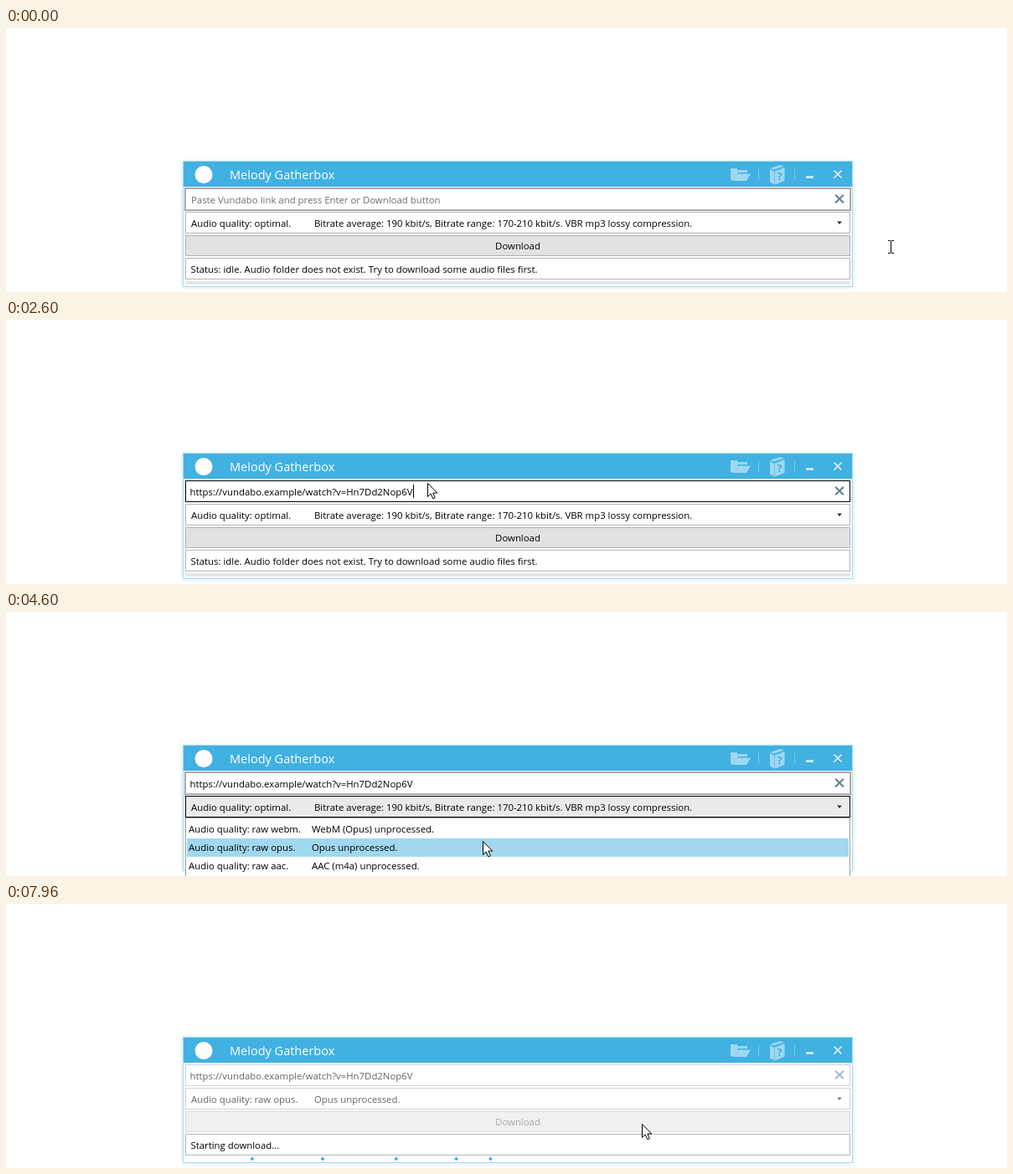
Recreate the animation shown at these times as an HTML page with a canvas. Size 1195x316 px, loop 8000 ms.

```html
<!DOCTYPE html>
<html lang="en">
<head>
<meta charset="utf-8">
<title>Melody Gatherbox</title>
<style>
html, body { margin: 0; width: 1195px; height: 316px; overflow: hidden; background: #fff; }
canvas { display: block; }
</style>
</head>
<body>
<canvas id="stage" width="1195" height="316"></canvas>
<script>
const ctx = document.getElementById('stage').getContext('2d');
const LOOP = 8000, STEP = 40;
const BLUE = '#41b1e1', PALE = '#9fd7f0', LINE = '#b5b5b5', FADED = '#d3d3d3';
const FACE = '"Open Sans", "Noto Sans", sans-serif';
const BODY = '11.39px ' + FACE;
const LINK = 'https://vundabo.example/watch?v=Hn7Dd2Nop6V';

// Key moments in ms
const HOVER = 1080, FOCUS = 1720, CARET = 2080, PASTE = 2320, COMBO = 3440,
  PRESS = 3720, SLIDE = 3781, PICK = 5000, CLOSED = 5080, HINT = 6680,
  GO = 6920, BUSY = 6990;

// Pointer moves: begin, end, goal; it rests in between
const MOVES = [
  [200, 680, 568, 185],
  [680, 1280, 501, 195],
  [2560, 3360, 775, 219],
  [3360, 3520, 792, 237],
  [4160, 4600, 569, 274],
  [4600, 4760, 567, 283],
  [5400, 5560, 594, 264],
  [5560, 6240, 759, 263]
];

// Bitrates fall evenly from the best grade to the worst
const GRADES = 'superb best great optimal good medium fair low worse worst'.split(' ');
const five = (v, round) => String(5 * round(v / 5)).padStart(3, '0');
function bitrate(i) {
  const rate = 65 + 125 * (GRADES.length - 1 - i) / 6;
  const range = five(rate - 20, Math.ceil) + '-' + five(rate + 20, Math.floor);
  return `Bitrate average: ${five(rate, Math.floor)} kbit/s, Bitrate range: ${range} kbit/s. VBR mp3 lossy compression`;
}
const ROWS = [
  ['raw webm', 'WebM (Opus) unprocessed.'],
  ['raw opus', 'Opus unprocessed.'],
  ['raw aac', 'AAC (m4a) unprocessed.'],
  ...GRADES.map((name, i) => [name, bitrate(i) + (name === 'worst' ? ' (Smallest mp3 file size).' : '.')])
];
const OPTIMAL = ROWS.find(row => row[0] === 'optimal'), OPUS = ROWS[1];
const ROW_H = 22, LIST_TOP = 247, LIST_H = 25 + ROW_H * (ROWS.length - 1);

const within = (t, a, b) => t >= a && t < b;
const clamp = v => Math.min(1, Math.max(0, v));
const ease = u => (1 - Math.cos(Math.PI * clamp(u))) / 2;

function rect(x, y, w, h, fill) {
  ctx.fillStyle = fill;
  ctx.fillRect(x, y, w, h);
}

function frame(x, y, w, h, line) {
  ctx.strokeStyle = line;
  ctx.lineWidth = 1;
  ctx.strokeRect(x + 0.5, y + 0.5, w - 1, h - 1);
}

function box(x, y, w, h, fill, line) {
  rect(x, y, w, h, fill);
  frame(x, y, w, h, line);
}

function text(str, x, y, color = '#000', font = BODY, align = 'left') {
  ctx.font = font;
  ctx.fillStyle = color;
  ctx.textAlign = align;
  ctx.fillText(str, x, y);
}

function shape(points, fill, line) {
  ctx.beginPath();
  points.forEach(([x, y]) => ctx.lineTo(x, y));
  ctx.closePath();
  ctx.fillStyle = fill;
  ctx.fill();
  if (line) {
    ctx.strokeStyle = line;
    ctx.lineWidth = 1;
    ctx.stroke();
  }
}

// Parallelogram from a corner, its width, height, and slants
function slab(x, y, w, h, skewX, skewY) {
  shape([[x, y], [x + w, y + skewY], [x + w + skewX, y + h + skewY], [x + skewX, y + h]], PALE);
}

function disc(x, y, r, fill) {
  ctx.beginPath();
  ctx.arc(x, y, r, 0, Math.PI * 2);
  ctx.fillStyle = fill;
  ctx.fill();
}

function cross(x, y, r, color, width) {
  ctx.strokeStyle = color;
  ctx.lineWidth = width;
  ctx.beginPath();
  [-r, r].forEach(d => {
    ctx.moveTo(x - d, y - r);
    ctx.lineTo(x + d, y + r);
  });
  ctx.stroke();
}

function pointer(t) {
  let x = 1056, y = 262;
  MOVES.forEach(([begin, end, goalX, goalY]) => {
    const k = ease((t - begin) / (end - begin));
    x += (goalX - x) * k;
    y += (goalY - y) * k;
  });
  return [Math.round(x), Math.round(y)];
}

function titleBar() {
  ctx.save();
  ctx.shadowColor = 'rgba(65,177,225,.3)';
  ctx.shadowBlur = 5;
  rect(211, 160, 800, 150, '#fff');
  ctx.restore();
  box(211, 159, 800, 151, '#fff', '#a9d9ee');
  rect(212, 160, 798, 30, BLUE);
  disc(236, 175.5, 10.5, '#fff');
  text('Melody Gatherbox', 267, 181, '#fff', '14.5px ' + FACE);

  // Folder
  rect(865, 168, 8, 14, PALE);
  rect(865, 170, 20, 3, PALE);
  slab(872, 174.5, 17, 8.5, -5, 0);
  // Help book
  slab(912, 169, 5.5, 15.5, 0, 3);
  slab(912, 168, 12, 1.6, 5, -4);
  slab(918, 171.5, 11.5, 16, 0, -4.5);
  text('?', 923.6, 182, BLUE, 'bold 13px ' + FACE, 'center');

  [898, 941].forEach(x => rect(x, 169, 1, 13, '#7cc9ea'));
  rect(955, 177, 9, 3, '#c6e8f6');
  cross(993, 175, 4.5, '#e3f4fb', 1.6);
}

function linkBox(t) {
  const busy = t >= BUSY;
  const glow = t < FOCUS || within(t, PRESS, CLOSED) || within(t, HINT, GO) ? 0.38
    : 0.19 * clamp((CARET + 80 - t) / 80);
  box(214, 192, 794, 26, '#fff', busy ? FADED : within(t, HOVER, PRESS) ? '#000' : LINE);
  if (glow) frame(213, 191, 796, 28, `rgba(0,0,0,${glow})`);

  if (t < PASTE) text('Paste Vundabo link and press Enter or Download button', 221, 210, '#6d6d6d');
  else text(LINK, 219.5, 210, busy ? '#666' : '#000');
  cross(995, 204.5, 4.8, busy ? '#a9bac8' : '#66808f', 2.1);

  const blink = t < PASTE || (t - PASTE) % 1060 < 530;
  if (within(t, CARET, PRESS) && blink) {
    ctx.font = BODY;
    const typed = t < PASTE ? 0 : ctx.measureText(LINK).width;
    rect(Math.round(220 + typed), 197, 1, 16, '#000');
  }
}

function combo(t) {
  const busy = t >= BUSY, color = busy ? '#666' : '#000';
  box(214, 220, 794, 26, within(t, PRESS, CLOSED) ? '#eaeaea' : '#fff',
    busy ? FADED : t >= COMBO ? '#000' : LINE);
  option(t < CLOSED ? OPTIMAL : OPUS, 221, 238, color);
  shape([[992, 231.5], [998, 231.5], [995, 235]], busy ? '#808080' : '#333');
}

function option([name, info], x, y, color) {
  text(`Audio quality: ${name}.`, x, y, color);
  text(info, x + 147, y, color);
}

function lowerRows(t) {
  const busy = t >= BUSY;
  const fill = busy ? '#f0f0f0' : t >= GO ? '#d0d0d0' : t >= CLOSED ? '#dedede' : '#e2e2e2';
  box(214, 248, 794, 25, fill, busy ? '#d9d9d9' : '#b0b0b0');
  text('Download', 611, 265, busy ? '#a9a9a9' : '#000', BODY, 'center');
  box(214, 275, 794, 26, '#fff', LINE);
  text(busy ? 'Starting download...'
    : 'Status: idle. Audio folder does not exist. Try to download some audio files first.', 220.5, 293);
  if (busy) dots((t - BUSY) / 1000);
  else rect(214, 303, 794, 4, '#e6e6e6');
}

// Five dots drift together while each eases ahead in turn
function dots(s) {
  ctx.save();
  ctx.beginPath();
  ctx.rect(214, 302, 794, 6);
  ctx.clip();
  for (let i = 0; i < 5; i++) disc(197 + 100 * s - 15 * i + 285 * ease(s - i / 6), 305, 2, BLUE);
  ctx.restore();
}

function dropdown(t, y) {
  if (!within(t, SLIDE, CLOSED)) return;
  const shown = Math.floor(LIST_H * clamp((t - SLIDE) / 150));
  const top = LIST_TOP + shown - LIST_H;
  ctx.save();
  ctx.beginPath();
  ctx.rect(214, LIST_TOP - 1, 794, shown + 1);
  ctx.clip();
  box(214, top - 1, 794, LIST_H + 1, '#fff', '#a39b96');
  const hover = Math.floor((y - LIST_TOP - 2) / ROW_H);
  ROWS.forEach((row, i) => {
    const rowY = top + 2 + i * ROW_H;
    if (i === hover) rect(216, rowY, 790, ROW_H, '#a0d8ef');
    option(row, 218, rowY + 15);
  });
  ctx.restore();
}

function drawPointer(t, x, y) {
  if ([PRESS, PICK, GO].some(click => within(t, click, click + 200))) {
    ctx.save();
    ctx.globalCompositeOperation = 'multiply';
    disc(x + 0.5, y, 12.5, '#fff566');
    ctx.restore();
  }
  if (x > 1011) {
    rect(x, y - 7, 1, 14, '#000');
    [-8, 7].forEach(d => [-3, 1].forEach(side => rect(x + side, y + d, 3, 1, '#000')));
    return;
  }
  const arrow = [[0, 0], [0, 16], [3.7, 12.5], [6.3, 18.4], [8.8, 17.3], [6.3, 11.6], [11.3, 11.6]];
  shape(arrow.map(([dx, dy]) => [x + dx + 0.5, y + dy + 0.5]), '#fff', '#000');
}

function draw(now) {
  const t = Math.floor((now % LOOP) / STEP) * STEP;
  const [x, y] = pointer(t);
  rect(0, 0, 1195, 316, '#fff');
  titleBar();
  linkBox(t);
  lowerRows(t);
  dropdown(t, y);
  combo(t);
  drawPointer(t, x, y);
}

const start = performance.now();
function tick() {
  draw(performance.now() - start);
  requestAnimationFrame(tick);
}
tick();
</script>
</body>
</html>
```
